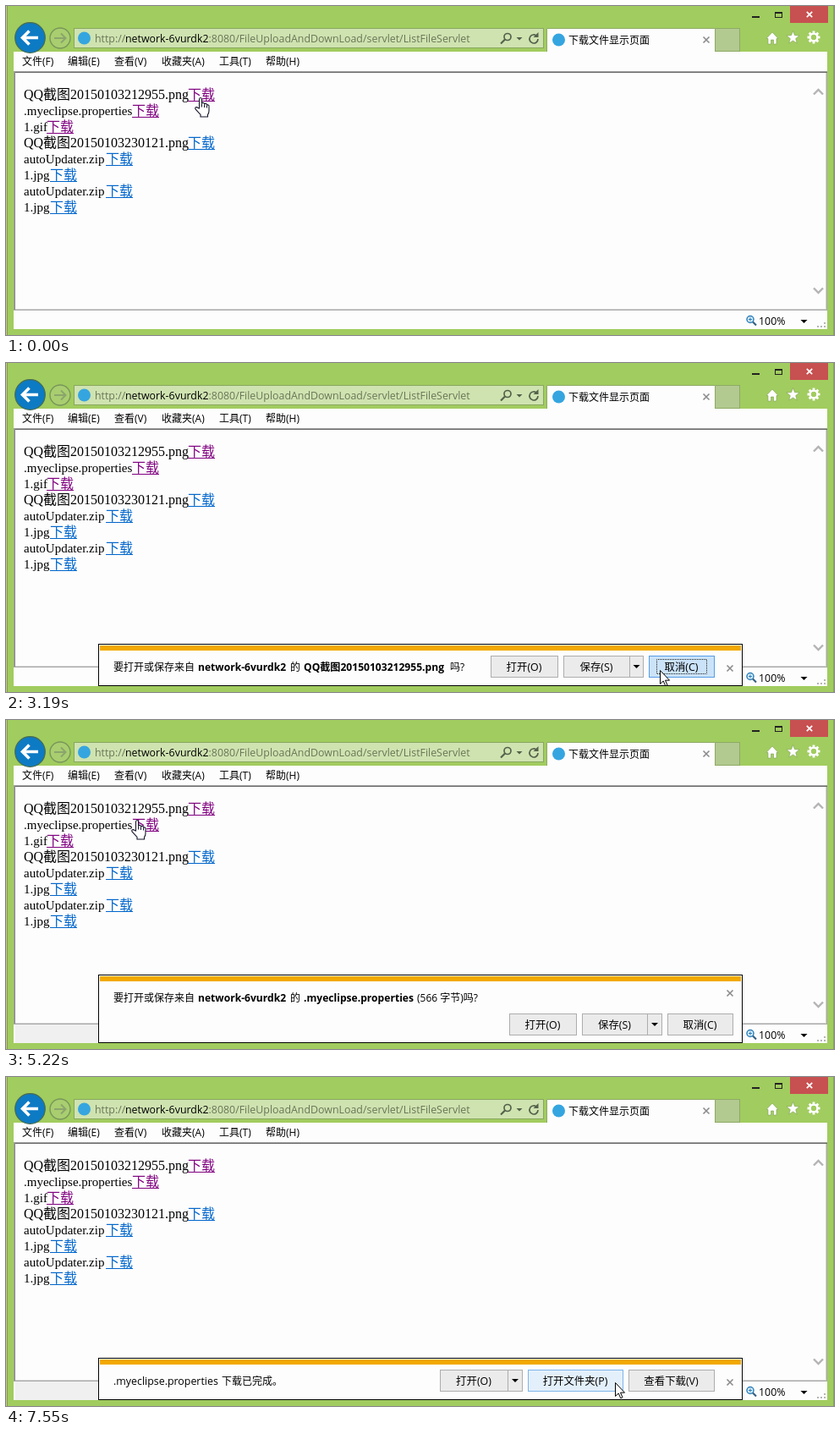
Recreate the animation shown at these times as an HTML page. Size 979 by 389 pixels, loop 8 s.

```html
<!DOCTYPE html>
<html lang="zh">
<head>
<meta charset="utf-8">
<title>下载文件显示页面</title>
<style>
html, body { margin: 0; width: 100%; height: 100%; overflow: hidden; background: #a1cc5f; }
svg { display: block; width: 100%; height: 100%; }
text { font: 12.4px "Open Sans", "Noto Sans CJK SC", "Noto Sans CJK", sans-serif; white-space: pre; }
.cn { font-size: 12px; }
.small { font-size: 11.8px; }
.b { font-weight: 700; font-size: 12.1px; }
.page { font: 16px "Liberation Serif", "Noto Sans CJK SC", "Noto Sans CJK", serif; }
.latin { font-size: 15px; }
.btn rect { fill: #ebebeb; stroke: #adadad; }
.btn.hover rect { fill: #e3f0fb; stroke: #7eb4ea; }
.btn.press rect { fill: #cbe3f8; stroke: #569de5; }
.btn rect.focus { display: none; }
.btn.press rect.focus { display: inline; fill: none; stroke: #222; stroke-dasharray: 1 1; stroke-dashoffset: .5; }
</style>
</head>
<body>
<svg id="stage" viewBox="0 0 979 389" xmlns="http://www.w3.org/2000/svg"></svg>
<script>
const HOST = 'network-6vurdk2';
const LOOP = 8000;

const rect = (x, y, w, h, fill, more = '') =>
  `<rect x="${x}" y="${y}" width="${w}" height="${h}" fill="${fill}" ${more}/>`;
const path = (d, stroke, width = 1, fill = 'none') =>
  `<path d="${d}" stroke="${stroke}" stroke-width="${width}" fill="${fill}"/>`;
const dot = (x, y, r, fill, more = '') => `<circle cx="${x}" cy="${y}" r="${r}" fill="${fill}" ${more}/>`;
const text = (x, y, s, cls = '', fill = '#000', more = '') =>
  `<text x="${x}" y="${y}" class="${cls}" fill="${fill}" ${more}>${s}</text>`;
const cross = (x, y, r, color, width) =>
  path(`M${x - r} ${y - r}l${2 * r} ${2 * r}m0 ${-2 * r}l${-2 * r} ${2 * r}`, color, width);
const caret = (x, y, color = '#000', r = 4) => path(`M${x - r} ${y}h${2 * r}l${-r} ${r}z`, 'none', 0, color);
const group = (id, s) => `<g id="${id}">${s}</g>`;

function tools() {
  const edge = '#7f9f55';
  const teeth = Array.from({ length: 8 }, (_, i) =>
    rect(953.6, 29.5, 2.8, 4, '#fff', `transform="rotate(${i * 45} 955 37)"`)).join('');
  const star = Array.from({ length: 10 }, (_, i) => {
    const a = i * Math.PI / 5 - Math.PI / 2, r = i % 2 ? 3.4 : 8;
    return `${(930.5 + r * Math.cos(a)).toFixed(1)} ${(37.5 + r * Math.sin(a)).toFixed(1)}`;
  }).join('L');
  return path('M899 38.5L906 31l7 7.5h-2V45h-3.500v-5h-3v5H901v-6.500z', edge, .6, '#fff') +
    path(`M${star}z`, edge, .6, '#fff') +
    teeth + dot(955, 37, 4.4, 'none', 'stroke="#fff" stroke-width="2.4"');
}

function frame() {
  const menus = [[19, '文件(F)'], [73, '编辑(E)'], [128, '查看(V)'], [184, '收藏夹(A)'], [252, '工具(T)'], [307, '帮助(H)']];
  const grip = [[967, 374], [967, 378], [963, 378], [959, 378]]
    .map(([x, y]) => rect(x, y, 2, 2, '#b5b5b5')).join('');
  return rect(0, 0, 979, 389, '#a1cc5f') +
    rect(0, 0, 1, 389, '#c8c98f') + rect(1, 0, 1, 389, '#7f9c4f') + rect(978, 0, 1, 389, '#86a853') +
    // caption buttons
    rect(882, 12, 9, 2, '#222') + rect(909.5, 7.5, 8, 6, 'none', 'stroke="#222"') + rect(909, 7, 9, 2, '#222') +
    rect(927, 0, 45, 20, '#c75050') + cross(950, 10, 3.2, '#fff', 1.7) +
    // address bar
    rect(80.5, 26.5, 555, 23, '#cfe3b0', 'stroke="#88a860"') +
    dot(92.5, 38, 7.5, '#35a5e0') +
    text(105, 43, 'http://', '', '#6a7658') + text(141, 43, HOST) +
    text(239.5, 43, ':8080/FileUploadAndDownLoad/servlet/ListFileServlet', '', '#6a7658') +
    dot(593, 36.5, 4, 'none', 'stroke="#53614a" stroke-width="1.7"') + path('M590 39.5l-5 5', '#53614a', 2.2) +
    caret(607, 37, '#53614a', 3.5) +
    path('M627.6 35.5A5 5 0 1 0 629 39', '#53614a', 1.7) + path('M629.5 31v6h-6z', 'none', 0, '#53614a') +
    // tabs
    rect(838.5, 26.5, 29, 27, '#b2c990', 'stroke="#8eaa66"') +
    path('M639.5 55V26.5H838.5V55', '#8eaa66', 1, '#fdfdfd') +
    dot(653.5, 40, 7.5, '#35a5e0') + text(665, 45, '下载文件显示页面', 'cn') + cross(828, 40, 3.5, '#8b8b8b', 1.6) +
    tools() +
    // menu, content and status areas
    rect(9, 54, 962, 328, '#fdfdfd') +
    menus.map(([x, s]) => text(x, 70, s, 'cn')).join('') +
    rect(9, 77, 962, 1, '#a0a0a0') + rect(9, 78, 962, 1, '#696969') +
    rect(9, 77, 1, 283, '#a0a0a0') + rect(10, 78, 1, 282, '#8a8a8a') +
    rect(969, 79, 1, 280, '#d5d5d5') + rect(970, 79, 1, 280, '#aaa') +
    rect(11, 358, 959, 1, '#d5d5d5') + rect(9, 359, 962, 1, '#a6a6a6') +
    path('M955 104.5l5.5-5.5l5.5 5.5M955 333.5l5.5 5.5l5.5-5.5', '#b4b4b4', 2.4) +
    // navigation, over the menu's edge
    dot(28.5, 37.5, 17.8, '#0d7ac4', 'stroke="#466b50" stroke-width="1.2"') +
    path('M38 37.5H20M27.5 29.5l-8 8l8 8', '#fff', 3.6) +
    dot(64, 38, 12, '#a9ce70', 'stroke="#78965a" stroke-width="1.4"') +
    path('M57 38H70M65 32.5l5.5 5.5l-5.5 5.5', '#8ba56c', 2) +
    // status bar
    group('bar', rect(109, 360, 762, 22, '#f0f0f0')) +
    group('barLeft', rect(11, 360, 98, 22, '#f0f0f0')) +
    group('hint', text(11, 375, `http://${HOST}:8080/FileUploadAndDownLoad/servlet/DownLoadServlet?filename=` +
      '3b7f20c1-94de-4a68-b05c-6e1d8f72a943_.myeclipse.properties', 'small')) +
    dot(880, 370.5, 4, '#d9eefb', 'stroke="#2f7fb8" stroke-width="1.5"') +
    path('M878 370.5h4m-2-2v4', '#2f7fb8') + path('M883 373.5l4 4', '#355f80', 2.2) +
    text(890, 377, '100%') + caret(943.5, 371) + grip;
}

function files() {
  const list = [
    ['QQ截图20150103212955.png', 215], ['.myeclipse.properties', 149], ['1.gif', 48],
    ['QQ截图20150103230121.png', 215], ['autoUpdater.zip', 118], ['1.jpg', 52],
    ['autoUpdater.zip', 118], ['1.jpg', 52]];
  return list.map(([name, x], i) => {
    const y = 110 + 19 * i, color = i < 3 ? '#800080' : '#0066cc';
    const cls = /截图/.test(name) ? 'page' : 'page latin';
    return text(21, y, name, cls) + text(x, y, '下载', 'page', color) + rect(x, y + 2, 32, 1, color);
  }).join('');
}

// drop: width of the arrow part on the right
function button(x, y, w, label, id = '', drop = 0) {
  const main = w - drop, h = 25;
  return `<g class="btn" id="${id}">` + rect(x + .5, y + .5, main, h, 'none') +
    (drop ? rect(x + main + .5, y + .5, drop - 1, h, 'none') + caret(x + main + drop / 2, y + 11) : '') +
    text(x + main / 2, y + 18, label, '', '#000', 'text-anchor="middle"') +
    rect(x + 9.5, y + 4.5, main - 18, 17, 'none', 'class="focus"') + '</g>';
}

const panel = (id, y, s) => group(id,
  rect(109.5, y + .5, 761, 381 - y, '#fdfdfd', 'stroke="#000"') + rect(111, y + 2, 758, 6, '#f2a900') + s);

const close = y => cross(856, y, 3.5, '#8b8b8b', 1.6);

const question = (y, name, tail, x) =>
  text(127, y, '要打开或保存来自', 'cn') + text(227, y, HOST, 'b') + text(336, y, '的', 'cn') +
  text(352, y, name, 'b') + text(x, y, tail, 'cn');

const panels = () =>
  panel('ask1', 332, question(364, 'QQ截图20150103212955.png', '吗?', 525) +
    button(573, 346, 79, '打开(O)') + button(659, 346, 95, '保存(S)', '', 17) +
    button(760, 346, 77, '取消(C)', 'cancel') + close(361)) +
  panel('ask2', 301, question(333, '.myeclipse.properties', '(566 字节)吗?', 486) +
    button(595, 347, 79, '打开(O)') + button(681, 347, 95, '保存(S)', 'save', 18) +
    button(782, 347, 77, '取消(C)') + close(323)) +
  panel('done', 332, text(127, 364, '.myeclipse.properties') + text(255, 364, '下载已完成。', 'cn') +
    button(513, 346, 98, '打开(O)', '', 18) + button(617, 346, 112, '打开文件夹(P)', 'folder') +
    button(736, 346, 101, '查看下载(V)') + close(361));

const pointers = () =>
  group('arrow', path('M.5 .5V16.5L4.2 13L6.8 18.8L9 17.8L6.5 12.2H11.5Z', '#000', 1, '#fff')) +
  group('hand', path('M5.5 13V2.5Q5.5 .5 7 .5T8.5 2.5V7.5Q9 6 10.5 6.5T11.5 8.5Q12 7 13.5 7.5T14.5 9.5' +
    'Q15 8.5 16.2 9T17 11V16Q17 18.5 15.5 20.5V23H7V20.5L1.2 14.2Q.2 12.5 1.5 11.8T4 12.5Z', '#14142a', 1.1, '#fff') +
    path('M8.5 7.5v4M11.5 8.5v3.5M14.5 9.5v3', '#14142a'));

// time, x, y, hand?
const moves = [
  [0, 223, 108, 1], [990, 285, 134], [1140, 345, 159],
  [1420, 412, 184], [1600, 505, 219], [1790, 603, 255], [1970, 661, 277],
  [2340, 678, 290], [2480, 706, 312], [2610, 738, 337], [2750, 764, 356], [2880, 773, 363],
  [3490, 640, 272], [3640, 495, 173],
  [3920, 398, 158], [4060, 285, 142], [4200, 219, 134],
  [4510, 186, 128], [4660, 148, 118, 1],
  [5780, 296, 181], [5910, 440, 242], [6210, 594, 299],
  [6580, 636, 318], [6720, 676, 338], [6860, 708, 354], [7010, 720, 361]];

const spans = {
  ask1: [150, 3340], ask2: [5220, 7310], done: [7310, LOOP],
  bar: [3340, LOOP], barLeft: [4660, LOOP], hint: [4660, 5220]
};
// button: hover time, press time
const states = { cancel: [2750, 3190], save: [6860, 7160], folder: [7430, LOOP] };

const stage = document.getElementById('stage');
stage.innerHTML = frame() + files() + panels() + pointers();
const el = id => document.getElementById(id);
const show = (id, on) => { el(id).style.display = on ? '' : 'none'; };

function draw(now) {
  const t = now % LOOP;
  for (const id in spans) show(id, t >= spans[id][0] && t < spans[id][1]);
  for (const id in states) {
    const [hover, press] = states[id];
    el(id).setAttribute('class', 'btn' + (t >= press ? ' press' : t >= hover ? ' hover' : ''));
  }
  const [, x, y, hand] = moves.filter(m => m[0] <= t).pop();
  show('hand', hand);
  show('arrow', !hand);
  el(hand ? 'hand' : 'arrow').setAttribute('transform', `translate(${x} ${y})`);
}

const start = performance.now();
function tick() {
  draw(performance.now() - start);
  requestAnimationFrame(tick);
}
tick();
</script>
</body>
</html>
```
